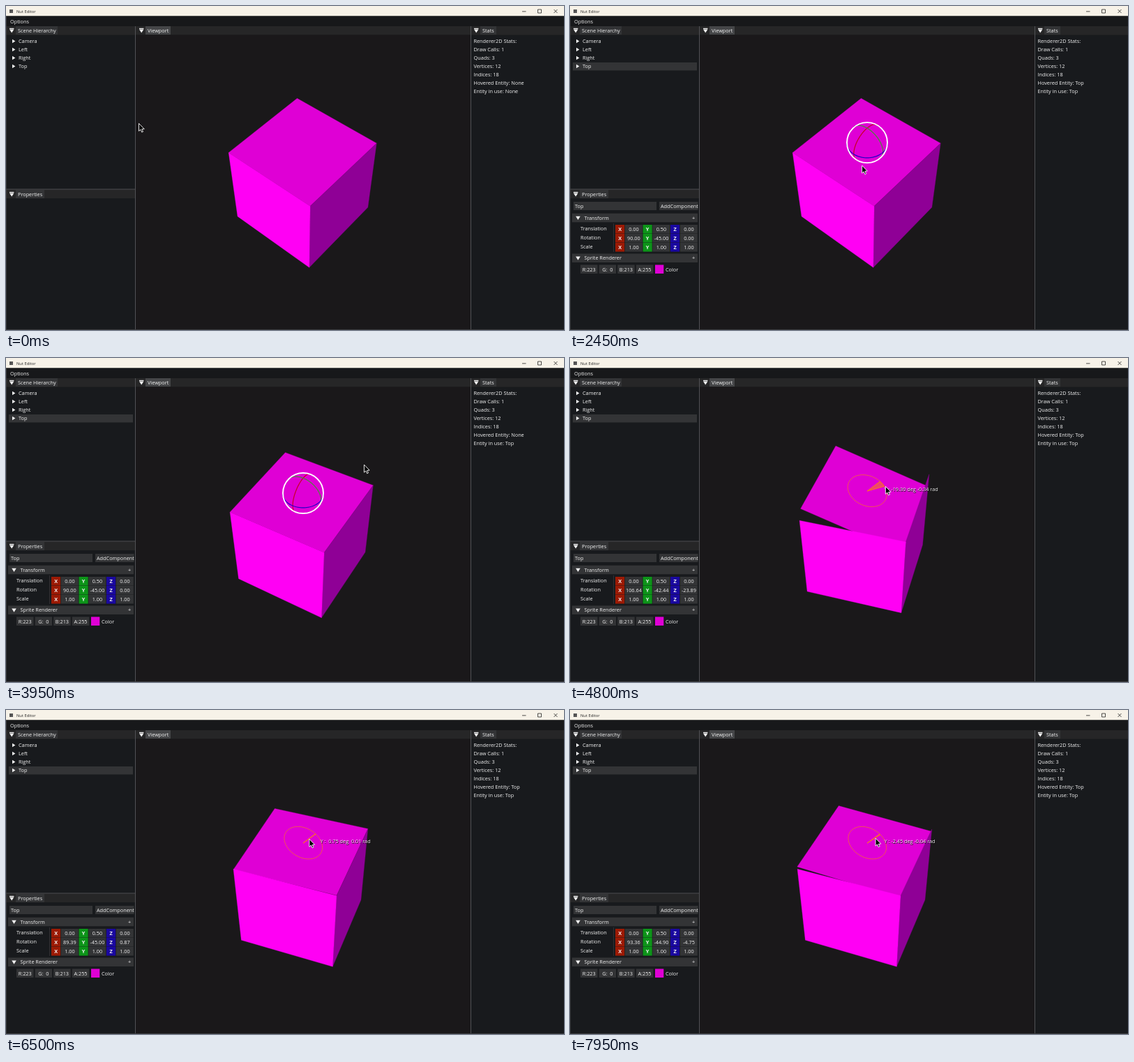
Recreate the animation shown at these times as an HTML page with a canvas. Size 800 px wide and 465 px high, loop 8 s.

```html
<!DOCTYPE html>
<html lang="en">
<head>
<meta charset="utf-8">
<title>Nut Editor</title>
<style>
html, body { margin: 0; width: 800px; height: 465px; overflow: hidden; background: #181a1d; }
canvas { display: block; }
</style>
</head>
<body>
<canvas id="stage" width="800" height="465"></canvas>
<script>
const ctx = document.getElementById('stage').getContext('2d');
const LOOP = 8000, RAD = Math.PI / 180;
const SELECT_AT = 500, GIZMO_AT = 2000, DRAG_AT = 4600, LAG = 20;
const FRAME = '#333436', BAR = '#262627', LINE = '#505155', INK = '#f2f2f2';
const COLORS = { Top: '#df00d5', Right: '#8f0096', Left: '#ff00f4' };

// Key points: time, then the values reached at that time
const PATH = [
  [50, 190, 168], [500, 414, 216], [1100, 362, 272], [1400, 405, 239],
  [2000, 405, 239], [3150, 443.5, 208], [3800, 520, 150], [4600, 444.5, 178]
];
const DRAG = [
  [4600, 0], [4854, -21.75], [5150, -50], [5580, -12.11], [5860, -38], [6200, -11],
  [6500, 0.75], [7050, -33], [7450, -3.37], [7930, -3.37], [7950, -2.45]
];
const REACH = [[4800, 0.205], [5550, 0.107], [6500, 0.093], [7950, 0.12]];
const CAMERA = [[3650, 5, 49.6], [4350, 30.5, 44], [5550, 25.2, 44], [6500, 24.6, 44]];

// Gizmo directions in scene axes, its ring radius and the angle where the drag starts
const I = [-1, 0, 0], J = [0, 1, 0], UP = [0, 0, 1];
const RING = 0.195, START = 50 * RAD;

function at(keys, t) {
  const n = keys.findIndex(k => k[0] > t);
  if (n === 0) return keys[0].slice(1);
  if (n < 0) return keys[keys.length - 1].slice(1);
  const a = keys[n - 1], b = keys[n], x = (t - a[0]) / (b[0] - a[0]);
  const s = x * x * (3 - 2 * x);
  return a.slice(1).map((v, i) => v + (b[i + 1] - v) * s);
}

function rect(x, y, w, h, color) {
  ctx.fillStyle = color;
  ctx.fillRect(x, y, w, h);
}

// y is the middle of the capital letters
function text(str, x, y, { size = 7.3, color = INK, align = 'left', bold = false } = {}) {
  ctx.font = `${bold ? 'bold ' : ''}${size}px "Open Sans", sans-serif`;
  ctx.textAlign = align;
  ctx.fillStyle = color;
  ctx.fillText(str, x, y + size * 0.36);
}

function trace(points, closed = true) {
  ctx.beginPath();
  points.forEach(p => ctx.lineTo(p[0], p[1]));
  if (closed) ctx.closePath();
}

function shape(points, color) {
  trace(points);
  ctx.fillStyle = color;
  ctx.fill();
}

function stroke(color, width) {
  ctx.strokeStyle = color;
  ctx.lineWidth = width;
  ctx.stroke();
}

const arrowRight = (x, y) => shape([[x - 2, y - 2.8], [x + 2.4, y], [x - 2, y + 2.8]], INK);
const arrowDown = (x, y) => shape([[x - 3.3, y - 2.2], [x + 3.3, y - 2.2], [x, y + 3]], INK);

// Scene axes: i runs along the hinge, j across it, y is up
function makeCamera([yaw, pitch]) {
  const q = (yaw + 45) * RAD, s = Math.sin(pitch * RAD), c = Math.cos(pitch * RAD);
  const view = ([i, j, y]) => {
    const x = i * Math.cos(q) + j * Math.sin(q);
    const z = j * Math.cos(q) - i * Math.sin(q);
    return [x, y * c - z * s, z * c + y * s];
  };
  const project = p => {
    const [x, y, z] = view(p), k = 846 / (6 - z);
    return [426 + x * k, 252.4 - y * k];
  };
  return { view, project };
}

function makeFaces(cam, tilt) {
  const c = Math.cos(tilt * RAD) / 2, s = Math.sin(tilt * RAD) / 2, h = 0.5;
  return Object.entries({
    Top: [[-h, -c, h - s], [h, -c, h - s], [h, c, h + s], [-h, c, h + s]],
    Right: [[-h, h, h], [h, h, h], [h, h, -h], [-h, h, -h]],
    Left: [[-h, -h, h], [-h, h, h], [-h, h, -h], [-h, -h, -h]]
  }).map(([name, pts]) => ({ name, points: pts.map(cam.project) }));
}

// Point on a ring around the middle of the top face; the overlay sits a little higher than the scene
function ringPoint(cam, e1, e2, r, f) {
  const p = e1.map((e, n) => r * (e * Math.cos(f) + e2[n] * Math.sin(f)));
  const [x, y] = cam.project([p[0], p[1], p[2] + 0.5]);
  return [x, y - 7.5];
}

function arc(cam, e1, e2, from, to) {
  return Array.from({ length: 49 }, (_, n) => ringPoint(cam, e1, e2, RING, from + (to - from) * n / 48));
}

function drawGizmo(cam, angle, dragging) {
  const center = ringPoint(cam, J, UP, 0, 0);
  if (dragging) {
    trace(arc(cam, J, UP, 0, 2 * Math.PI));
    stroke('rgba(255,128,16,.8)', 0.8);
    shape([center, ...arc(cam, J, UP, START, START + angle * RAD)], 'rgba(255,128,16,.54)');
    stroke('#ff8010', 0.9);
    const label = `Y : ${angle.toFixed(2).padStart(5)} deg ${(angle * RAD).toFixed(2).padStart(5)} rad`;
    text(label, 451, 189, { color: '#000' });
    text(label, 450.5, 188.5);
    return;
  }
  // Only the half of each ring that faces the viewer
  const eye = cam.view([0, 0, 0.5]);
  const facing = e => {
    const v = cam.view(e);
    return v[2] * (6 - eye[2]) - v[1] * eye[1];
  };
  for (const [e1, e2, color] of [[I, UP, '#c80022'], [J, UP, '#4a8a3c'], [I, J, '#2200c8']]) {
    const mid = Math.atan2(facing(e2), facing(e1));
    trace(arc(cam, e1, e2, mid - Math.PI / 2, mid + Math.PI / 2), false);
    stroke(color, 1.2);
  }
  ctx.beginPath();
  ctx.arc(center[0], center[1], 29, 0, 2 * Math.PI);
  stroke('#fff', 1.9);
}

function drawTab(x, y, w, label, color = FRAME) {
  rect(x + 14, y - 6, w, 12, color);
  rect(x + 5, y - 3.2, 6.4, 1.2, INK);
  arrowDown(x + 8.2, y + 0.6);
  text(label, x + 17, y);
}

function drawWindow() {
  rect(0, 0, 800, 465, '#181a1d');
  rect(0, 0, 800, 14.5, '#f7f2e8');
  rect(5, 5, 5, 5, '#555');
  text('Nut Editor', 15, 7.5, { size: 5.8, color: '#222' });
  rect(740, 7.5, 5.5, 0.8, '#222');
  trace([[762.5, 5], [767.5, 5], [767.5, 10], [762.5, 10]]);
  stroke('#222', 0.8);
  for (const dir of [-1, 1]) {
    trace([[788 - 2.5 * dir, 5], [788 + 2.5 * dir, 10]], false);
    stroke('#222', 0.8);
  }

  rect(0, 14.5, 800, 14.5, '#17181a');
  text('Options', 6, 22);
  rect(0, 29, 800, 12.5, BAR);
  rect(0, 263.5, 186, 12.5, BAR);
  rect(186, 41.5, 480, 423, '#1a181a');
  rect(185, 29, 1, 436, LINE);
  rect(666, 29, 1, 436, LINE);
  rect(0, 262.5, 185, 1, LINE);
  rect(0, 15, 0.6, 450, '#45464a');
  rect(0, 464, 800, 1, '#3a3b3e');
  drawTab(0, 35, 60, 'Scene Hierarchy');
  drawTab(186, 35, 36, 'Viewport', '#454648');
  drawTab(666, 35, 23, 'Stats');
  drawTab(0, 270, 41, 'Properties');
}

function drawHeader(y, label) {
  rect(3, y - 6.3, 180, 12.6, FRAME);
  arrowDown(11.5, y);
  text(label, 20.5, y);
  text('+', 177, y, { align: 'center' });
}

function drawProperties(tilt) {
  rect(5, 281, 119, 12, FRAME);
  text('Top', 7, 287);
  ctx.save();
  ctx.beginPath();
  ctx.rect(128, 281, 55.5, 12);
  ctx.clip();
  rect(128, 281, 56, 12, FRAME);
  text('AddComponent', 130, 287);
  ctx.restore();

  drawHeader(304, 'Transform');
  rect(62, 312, 0.7, 41, '#3a3b40');
  const S = Math.sin(tilt * RAD), k = Math.SQRT1_2 * Math.cos(tilt * RAD);
  const euler = [90 - Math.atan(S) / RAD, -Math.asin(k) / RAD, Math.atan2(S, k) / RAD];
  [['Translation', [0, 0.5, 0]], ['Rotation', euler], ['Scale', [1, 1, 1]]].forEach(([label, values], row) => {
    const y = 320.5 + row * 13;
    text(label, 15, y - 1);
    values.forEach((v, n) => {
      const x = 65 + n * 39.5;
      rect(x, y - 6.5, 13.2, 12.6, ['#9c1a04', '#0d9419', '#1a08a0'][n]);
      rect(x + 13.8, y - 6.5, 25, 12.6, FRAME);
      text('XYZ'[n], x + 6.6, y, { align: 'center', bold: true });
      text(v.toFixed(2), x + 26.4, y, { align: 'center' });
    });
  });

  drawHeader(361.7, 'Sprite Renderer');
  ['R:223', 'G:  0', 'B:213', 'A:255'].forEach((label, n) => {
    rect(15 + n * 26.6, 371.5, 24.5, 12.5, FRAME);
    text(label, 27.2 + n * 26.6, 378, { align: 'center' });
  });
  rect(122, 371.5, 12.3, 12.5, COLORS.Top);
  text('Color', 137, 378);
}

function drawCursor(x, y) {
  const points = [[0, 0], [0, 11], [2.5, 8.8], [4.2, 12.6], [6, 11.8], [4.3, 8.2], [7.7, 8]];
  shape(points.map(p => [p[0] + x + 0.5, p[1] + y + 0.5]), '#000');
  stroke('#fff', 0.9);
}

function draw(t) {
  const selected = t >= SELECT_AT, dragging = t >= DRAG_AT;
  const [angle] = at(DRAG, t), [tilt] = at(DRAG, t - LAG), [reach] = at(REACH, t);
  const cam = makeCamera(at(CAMERA, t));
  // While dragging, the pointer stays on the moving side of the wedge
  const [mx, my] = dragging ? ringPoint(cam, J, UP, reach, START + angle * RAD) : at(PATH, t);

  drawWindow();
  if (selected) rect(4, 81, 178, 11.5, FRAME);
  ['Camera', 'Left', 'Right', 'Top'].forEach((name, n) => {
    arrowRight(11, 50.5 + n * 12);
    text(name, 18, 50.5 + n * 12);
  });
  if (selected) drawProperties(tilt);

  let hovered = 'None';
  for (const { name, points } of makeFaces(cam, tilt)) {
    shape(points, COLORS[name]);
    stroke(COLORS[name], 0.3);
    if (ctx.isPointInPath(mx, my)) hovered = name;
  }
  if (t >= GIZMO_AT) drawGizmo(cam, angle, dragging);

  ['Renderer2D Stats:', 'Draw Calls: 1', 'Quads: 3', 'Vertices: 12', 'Indices: 18',
    `Hovered Entity: ${hovered}`, `Entity in use: ${selected ? 'Top' : 'None'}`
  ].forEach((line, n) => text(line, 670.5, 50.5 + n * 12));
  drawCursor(mx, my);
}

const begin = performance.now();
function tick() {
  draw((performance.now() - begin) % LOOP);
  requestAnimationFrame(tick);
}
tick();
</script>
</body>
</html>
```
